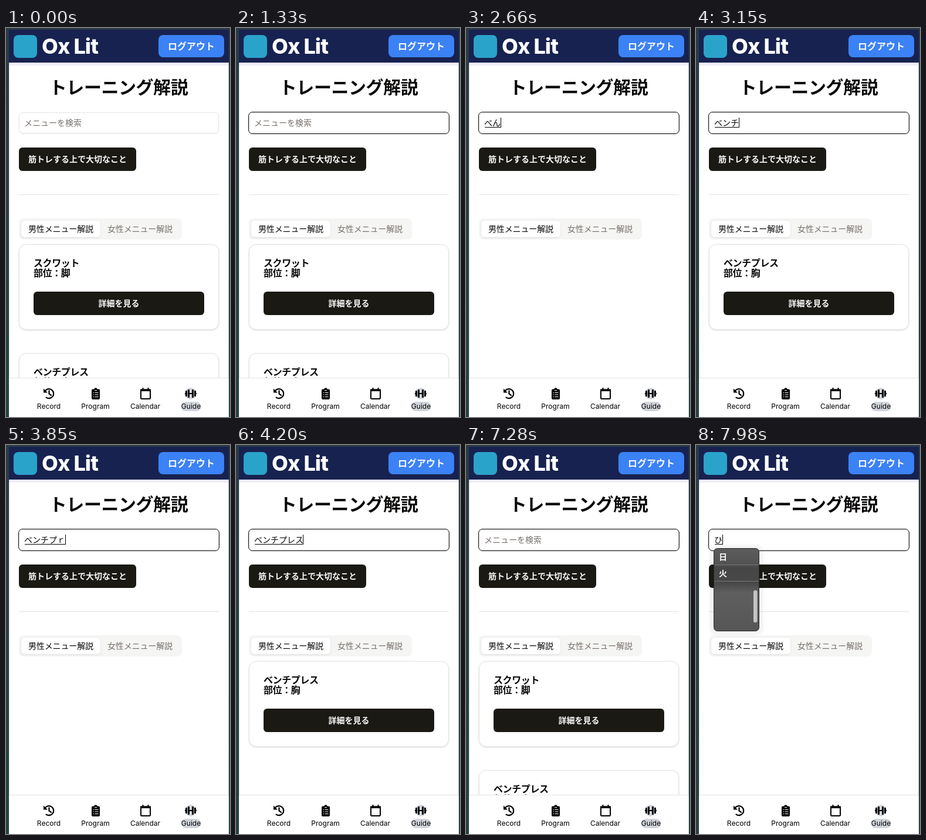
An HTML page for the animation above (8 s loop, 382 by 664 pixels).

```html
<!DOCTYPE html>
<html lang="ja">
<head>
<meta charset="utf-8">
<title>トレーニング解説</title>
<style>
html, body { margin: 0; width: 100%; height: 100%; overflow: hidden; background: #fff; }
svg { display: block; width: 382px; height: 664px; }
text { font: 14px Inter, "Noto Sans CJK JP", "Noto Sans CJK", sans-serif; fill: #0c0a09; white-space: pre; }
.mid { text-anchor: middle; }
.light { fill: #fafaf9; font-weight: 600; }
.tab { font-weight: 500; letter-spacing: -.01em; }
.muted { fill: #78716c; }
.brand { font-size: 36px; font-weight: 800; letter-spacing: -.025em; fill: #fff; }
.h1 { font-size: 30px; font-weight: 700; letter-spacing: -.015em; }
.h2 { font-size: 16px; font-weight: 700; letter-spacing: -.025em; }
.nav text { font-size: 12px; fill: #000; text-anchor: middle; }
.dark { fill: #1a1914; }
.card, .field { fill: #fff; stroke: #e7e5e4; }
.card { filter: drop-shadow(0 1px 1.5px rgba(0,0,0,.16)); }
.field { filter: drop-shadow(0 1px 1px rgba(0,0,0,.06)); }
.on { filter: drop-shadow(0 1px 1.5px rgba(0,0,0,.1)); }
</style>
</head>
<body>
<svg viewBox="0 0 382 664">
  <defs>
    <linearGradient id="edge" x2="0" y2="1">
      <stop stop-color="#2b3b44"/><stop offset="1" stop-color="#26443f"/>
    </linearGradient>
    <linearGradient id="shade" x2="0" y2="1">
      <stop stop-color="#5446a8" stop-opacity=".17"/><stop offset="1" stop-color="#5446a8" stop-opacity="0"/>
    </linearGradient>
    <linearGradient id="panel" x2="0" y2="1">
      <stop stop-color="#5c5c5c"/><stop offset=".17" stop-color="#545454"/>
      <stop offset=".24" stop-color="#464646"/><stop offset=".42" stop-color="#484848"/>
      <stop offset=".54" stop-color="#5f5f5f"/><stop offset="1" stop-color="#565656"/>
    </linearGradient>
  </defs>

  <rect width="382" height="664" fill="url(#edge)"/>
  <rect x="5" y="3" width="375" height="661" fill="#fff"/>
  <path d="M5.5 59v539M379.5 59v539" stroke="#e5e7eb"/>

  <rect x="5" y="59" width="375" height="7" fill="url(#shade)"/>
  <rect x="5" y="3" width="375" height="56" fill="#182250"/>
  <rect x="13" y="12" width="40" height="39" rx="8" fill="#2aa3cb"/>
  <text class="brand" x="61" y="44">Ox Lit</text>
  <rect x="260" y="12" width="112" height="38" rx="8" fill="#3b82f6"/>
  <text class="light mid" x="316" y="37" style="font-size:16px">ログアウト</text>

  <text class="h1 mid" x="192" y="112">トレーニング解説</text>

  <rect class="field" x="22.5" y="144.5" width="340" height="35" rx="6"/>
  <rect id="ring" x="21.5" y="143.5" width="342" height="37" rx="6.5" fill="none" stroke="#0c0a09"/>
  <text id="typed" x="31" y="167"></text>
  <rect id="under" x="32" y="169" height="1"/>
  <rect id="caret" width="1" height="17"/>

  <rect class="dark" x="22" y="204" width="200" height="40" rx="6"/>
  <text class="light mid" x="122" y="229">筋トレする上で大切なこと</text>
  <rect x="22" y="284" width="341" height="1" fill="#e3e2e1"/>

  <rect x="22" y="325" width="278" height="36" rx="8" fill="#f5f5f4"/>
  <rect class="on" x="26" y="329" width="135" height="28" rx="6" fill="#fff"/>
  <text class="tab" x="38" y="348">男性メニュー解説</text>
  <text class="tab muted" x="173" y="348">女性メニュー解説</text>

  <g id="cards"></g>

  <g class="nav">
    <rect x="5" y="597" width="375" height="67" fill="#fff"/>
    <rect x="5" y="597" width="375" height="1" fill="#e2e3e6"/>
    <circle cx="315" cy="624" r="10" fill="#d1d5db"/>
    <rect x="298.5" y="638" width="34" height="16" rx="8" fill="#d1d5db"/>

    <path d="M67 619A8 8 0 1 1 68.5 630.6M73.5 619.5v5l3.4 2.4" fill="none" stroke="#000" stroke-width="2.3" stroke-linecap="round"/>
    <path d="M64 615.5v7h7z"/>

    <path d="M148 616.5h2.2a2.9 2.9 0 0 1 5.6 0h2.2a2 2 0 0 1 2 2v13.5a2 2 0 0 1-2 2h-10a2 2 0 0 1-2-2v-13.5a2 2 0 0 1 2-2z"/>
    <path d="M151 618.5h4M148.5 622.5h1.5M151.5 622.5h6M148.5 626h1.5M151.5 626h6M148.5 629.5h1.5M151.5 629.5h6" stroke="#fff" stroke-width="1.2"/>

    <rect x="230" y="617.5" width="16" height="15.5" rx="1.5" fill="none" stroke="#000" stroke-width="2"/>
    <path d="M229 616.5h18v3.5h-18zM232.5 614h2v3h-2zM241.5 614h2v3h-2z"/>

    <g id="bell">
      <rect x="305" y="623" width="1" height="2"/>
      <rect x="306" y="619" width="3" height="10" rx=".8"/>
      <rect x="310" y="617" width="3" height="14" rx=".8"/>
    </g>
    <use href="#bell" transform="matrix(-1 0 0 1 630 0)"/>
    <rect x="313" y="623" width="4" height="2"/>

    <text x="73" y="650">Record</text>
    <text x="152.5" y="650">Program</text>
    <text x="237.5" y="650">Calendar</text>
    <text x="315.5" y="650">Guide</text>
  </g>

  <g id="popup">
    <rect x="23" y="170" width="92" height="155" rx="13" opacity=".045" style="filter:blur(2px)"/>
    <rect x="30.5" y="176.5" width="77" height="141" rx="6" fill="url(#panel)" stroke="#2b2b2b"/>
    <path d="M31 204.5h76M31 232.5h76" stroke="#777"/>
    <rect x="98" y="248" width="6.5" height="55" rx="3.2" fill="#c4c4c4"/>
    <text class="light" id="pick0" x="39" y="196"></text>
    <text class="light" id="pick1" x="39" y="224"></text>
  </g>
</svg>
<script>
const LOOP = 8000;
const MENU = [['スクワット', '脚'], ['ベンチプレス', '胸'], ['ベントオーバーロウ', '背中']];
const PICKS = { 'べ': ['部', '別'], 'ひ': ['日', '火'] };

// [start, text, flags]  f: focus, c: caret, u: composing underline, p: candidates
const STEPS = [
  [0, '', ''], [630, '', 'fc'], [1120, '', 'f'], [1680, '', 'fc'],
  [1960, 'ｂ', 'fcu'], [2100, 'べ', 'fcu'], [2380, 'べ', 'fcup'],
  [2450, 'べｎ', 'fcu'], [2660, 'べん', 'fcu'],
  [2940, 'べんｃ', 'fcu'], [3080, 'べんち', 'fcu'], [3150, 'ベンチ', 'fcu'],
  [3430, 'ベンチｐ', 'fcu'], [3570, 'ベンチプ', 'fcu'],
  [3780, 'ベンチプｒ', 'fcu'], [3920, 'ベンチプレ', 'fcu'],
  [4060, 'ベンチプレｓ', 'fcu'], [4200, 'ベンチプレス', 'fcu'],
  [4620, 'ベンチプレス', 'fc'], [5180, 'ベンチプレス', 'f'], [5670, 'ベンチプレス', 'fc'],
  [6090, 'ベンチプレ', 'fc'], [6230, 'ベンチプ', 'f'], [6370, 'ベンチ', 'f'],
  [6580, 'ベン', 'f'], [6720, 'ベ', 'f'], [6860, '', 'fc'], [7280, '', 'f'],
  [7630, 'ｈ', 'fcu'], [7700, 'ひ', 'fcu'], [7980, 'ひ', 'fcup']
];

const $ = id => document.getElementById(id);
const show = (id, on) => $(id).setAttribute('visibility', on ? 'visible' : 'hidden');
const caretX = n => Math.round(31 + 13.9 * n);

const card = ([name, part], i) => `<g transform="translate(0 ${i * 186})">
  <rect class="card" x="22.5" y="369.5" width="340" height="145" rx="12"/>
  <text class="h2" x="47" y="407">${name}</text>
  <text class="h2" x="47" y="424">部位：${part}</text>
  <rect class="dark" x="47" y="450" width="291" height="40" rx="6"/>
  <text class="light mid" x="192.5" y="475">詳細を見る</text></g>`;

function render([, text, flags]) {
  const has = f => flags.includes(f);
  const x = caretX(text.length);
  $('typed').textContent = text || 'メニューを検索';
  $('typed').setAttribute('class', text ? '' : 'muted');
  $('caret').setAttribute('x', x);
  $('caret').setAttribute('y', text ? 153 : 154);
  $('under').setAttribute('width', Math.max(0, x - 32));
  show('ring', has('f'));
  show('caret', has('c'));
  show('under', has('u'));
  show('popup', has('p'));
  (PICKS[text] || ['', '']).forEach((s, i) => { $('pick' + i).textContent = s; });
  $('cards').innerHTML = MENU.filter(m => m[0].includes(text)).slice(0, 2).map(card).join('');
}

const origin = performance.now();
let current;
function tick() {
  const t = (performance.now() - origin) % LOOP;
  const step = STEPS.filter(s => s[0] <= t).pop();
  if (step !== current) render(current = step);
  requestAnimationFrame(tick);
}
tick();
</script>
</body>
</html>
```
